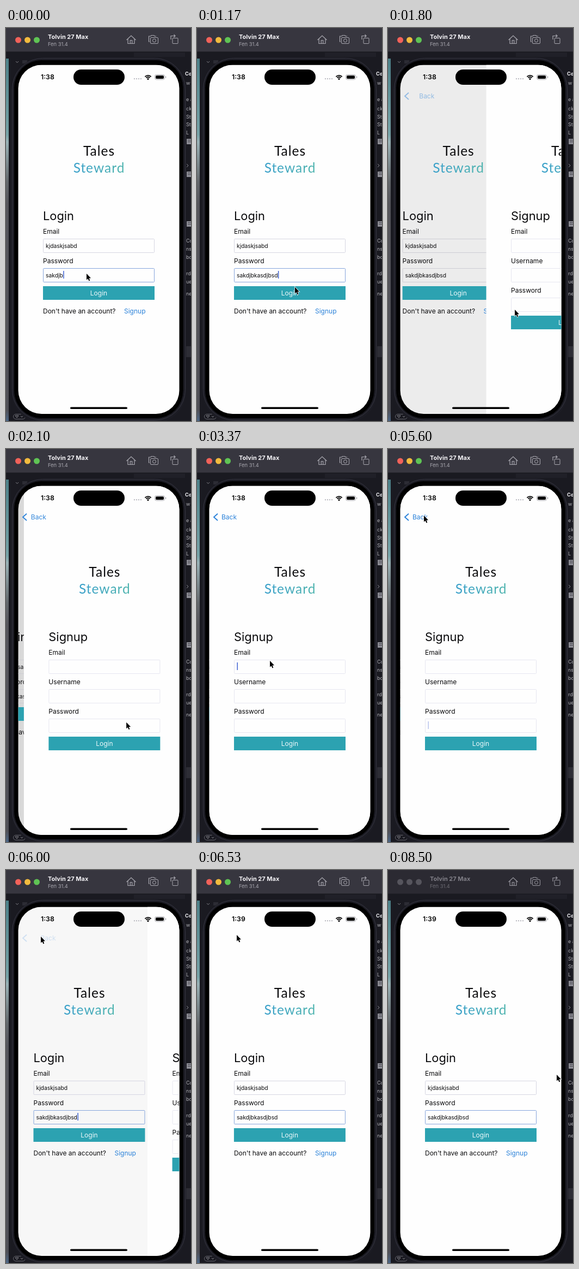
An HTML page with a canvas that plays this animation: 340x720 px, repeating every 8530 ms.

```html
<!DOCTYPE html>
<html lang="en">
<head>
<meta charset="utf-8">
<title>Login and signup</title>
<style>
  html, body { margin: 0; width: 100%; height: 100%; overflow: hidden; background: #1a1a21; }
  canvas { display: block; width: 340px; height: 720px; }
</style>
</head>
<body>
<canvas id="stage"></canvas>
<script>
const LOOP = 8530, W = 340, H = 720;
const SCREEN = { x: 22.5, y: 67.5, w: 296, h: 639.5, r: 43 };
const PAPER = 254, DIMMED = 216;
const TEAL = '#2ca2b1', BLUE = '#2b82d9', INK = '#0a0a0c';

const canvas = document.getElementById('stage');
const ratio = window.devicePixelRatio || 1;
canvas.width = W * ratio;
canvas.height = H * ratio;
const c = canvas.getContext('2d');

const clamp = v => Math.max(0, Math.min(1, v));
const mix = (a, b, p) => a + (b - a) * p;
const ease = p => p * p * (3 - 2 * p);
const grey = v => `rgb(${v}, ${v}, ${v})`;

function text(s, x, y, size, color, weight = 400, align = 'left', family = 'Inter') {
  c.font = `${weight} ${size}px ${family}, sans-serif`;
  c.textAlign = align;
  c.fillStyle = color;
  c.fillText(s, x, y);
}

function rect(x, y, w, h, color) {
  c.fillStyle = color;
  c.fillRect(x, y, w, h);
}

function round(x, y, w, h, r, color) {
  c.beginPath();
  c.roundRect(x, y, w, h, r);
  c.fillStyle = color;
  c.fill();
}

function frame(x, y, w, h, r, color, line = 1) {
  c.beginPath();
  c.roundRect(x, y, w, h, r);
  c.strokeStyle = color;
  c.lineWidth = line;
  c.stroke();
}

function disc(x, y, r, color) {
  c.beginPath();
  c.arc(x, y, r, 0, 7);
  c.fillStyle = color;
  c.fill();
}

function path(points, color, line = 1.2) {
  c.beginPath();
  for (let i = 0; i < points.length; i += 2) c.lineTo(points[i], points[i + 1]);
  c.strokeStyle = color;
  c.lineWidth = line;
  c.stroke();
}

// Critically damped spring, 0 to 1
function spring(ms) {
  const u = Math.max(0, ms) * 0.012;
  return 1 - (1 + u) * Math.exp(-u);
}

function pushed(t) {
  return t < 5750 ? spring(t - 1670) : 1 - spring(t - 5750);
}

function blink(t) {
  const p = t % 1000;
  return p < 700 ? 1 - clamp((p - 480) / 80) : clamp((p - 900) / 100);
}

// Pointer stops: time, x, y
const STOPS = [
  [0, 148, 450], [950, 148, 450], [1480, 233, 516], [1950, 233, 516],
  [2650, 134, 388], [3420, 134, 388], [3700, 136, 446], [4050, 136, 446],
  [4350, 138, 500], [4800, 138, 500], [5480, 66, 122], [5700, 66, 122],
  [6000, 64, 122], [6250, 64, 122], [6500, 73, 119], [6850, 73, 119],
  [7480, 326, 250], [8100, 310, 375], [LOOP, 310, 375]
];

function pointer(t) {
  const i = Math.max(1, STOPS.findIndex(s => s[0] > t));
  const a = STOPS[i - 1], b = STOPS[i];
  const p = ease((t - a[0]) / (b[0] - a[0]));
  c.save();
  c.translate(mix(a[1], b[1], p), mix(a[2], b[2], p));
  c.beginPath();
  [[0, 0], [0, 11.5], [2.6, 9.2], [4.5, 13.4], [6.3, 12.6], [4.5, 8.5], [8, 8.3]]
    .forEach(q => c.lineTo(...q));
  c.closePath();
  c.strokeStyle = '#fff';
  c.lineWidth = 1.4;
  c.stroke();
  c.fillStyle = '#000';
  c.fill();
  c.restore();
}

function desktop() {
  rect(0, 0, W, H, '#1a1a21');
  const side = c.createLinearGradient(0, 56, 0, H);
  [[0, '#4c8088'], [.21, '#76a2a6'], [.23, '#98b0b4'], [.34, '#63676b'],
   [.4, '#55555b'], [.97, '#4f4f56'], [1, '#4b6585']].forEach(s => side.addColorStop(...s));
  rect(0, 56, 5, H - 56, side);
  rect(235, 45, 94, 8, '#202028');
  path([18, 61, 20.5, 63.5, 23, 61], '#85858c', 1);
  rect(30, 59, 9, 6, '#2c2c34');

  // Clipped edge of the window behind
  [['Co', 87], ['w', 104], ['e a', 134], ['ck', 151], ['Sta', 166], ['Sta', 180],
   ['L', 195], ['Co', 393], ['nst', 408], ['bo', 423], ['rd', 453], ['ue', 468], ['ne', 490]]
    .forEach(([s, y], i) => text(s, i ? 331 : 329, y, 9, i ? '#b0b0b6' : '#eeeef2', i ? 400 : 700));
  path([332, 249, 335, 252, 332, 255], '#85858c', 1);
  [203, 263, 354].forEach(y => {
    rect(332, y, 8, 10, '#8c8c94');
    rect(334, y + 2, 6, 1, '#44444c');
    rect(334, y + 5, 6, 1, '#44444c');
  });
  rect(331, 583, 9, 20, '#2d2d35');
  frame(13.5, 707.5, 22, 9, 4.5, '#66666e');
  path([17, 710, 23, 710, 20, 714, 17, 710], '#85858c', 1);
  path([27, 711, 29, 713, 31, 711], '#85858c', 1);
}

function titleBar(active) {
  rect(0, 0, W, 44, active ? '#37363f' : '#2b2a32');
  rect(0, 43, W, 1, '#202027');
  const lights = active ? ['#f2625a', '#f2bb3e', '#5fc454'] : ['#56555d', '#56555d', '#56555d'];
  lights.forEach((col, i) => disc(22.5 + i * 17, 22, 5.5, col));
  text('Tolvin 27 Max', 77, 20, 11, active ? '#f4f3f6' : '#807f87', 700);
  text('Fen 31.4', 77, 33, 9.3, active ? '#a9a8b0' : '#6d6c74');

  const tone = active ? '#a9a8b0' : '#98979f';
  path([221.5, 22, 230, 14, 238.5, 22], tone);
  path([224, 20, 224, 28.5, 236, 28.5, 236, 20], tone);
  path([228.3, 28, 228.3, 22.5, 231.7, 22.5, 231.7, 28], tone);
  path([264, 25, 262.5, 25, 262.5, 15, 266, 15, 267, 13.5, 272, 13.5, 273, 15, 276, 15], tone);
  frame(265.5, 17.5, 14, 11, 1.5, tone);
  c.beginPath();
  c.arc(272.5, 23, 3, 0, 7);
  c.stroke();
  frame(306, 18.5, 10, 10, 1, tone);
  path([303, 21, 303, 14.5, 311, 14.5], tone);
  path([308.5, 12, 311, 14.5, 308.5, 17], tone);
}

function body() {
  round(10, 54, 321, 670, 58, '#1c1c24');
  frame(11.5, 55.5, 318, 663, 56, '#34343f');
  round(14, 58, 312.5, 658, 52, '#000');
  frame(14.5, 58.5, 311.5, 657, 51, '#1e1e27');
}

function brand() {
  c.letterSpacing = '1px';
  text('Tales', 171, 234, 24.5, INK, 400, 'center', 'Lato');
  const g = c.createLinearGradient(123, 0, 218, 0);
  g.addColorStop(0, '#389fca');
  g.addColorStop(1, '#4fb4ae');
  text('Steward', 171, 265, 24.5, g, 400, 'center', 'Lato');
  c.letterSpacing = '0px';
}

function caret(x, y, alpha) {
  c.globalAlpha = alpha;
  rect(x, y + 5, 1.4, 14, '#3157cf');
  c.globalAlpha = 1;
}

function field(label, y, border, value = '', caretAlpha = 0) {
  text(label, 68, y - 9.5, 12, INK);
  frame(68.5, y + .5, 204, 25, 1, border);
  text(value, 73, y + 16.5, 10.3, INK);
  if (caretAlpha > 0) {
    c.font = '400 10.3px Inter, sans-serif';
    caret(73.5 + c.measureText(value).width, y, caretAlpha);
  }
}

function button(y) {
  rect(68, y, 205, 25, TEAL);
  text('Login', 170.5, y + 17, 12, '#eef9fb', 400, 'center');
}

function loginPage(t, p) {
  rect(0, SCREEN.y, W + 90, SCREEN.h, grey(Math.round(mix(PAPER, DIMMED, p))));
  brand();
  text('Login', 68, 351.5, 21.8, INK);
  const typed = Math.min(14, 6 + Math.floor(t / 110));
  const focused = t < 1670 || t > 5800;
  const glow = t < 960 ? 1 : blink(t + 60);
  field('Email', 386, focused ? '#d6d6e2' : '#cdcdd4', 'kjdaskjsabd');
  field('Password', 440, focused ? '#86a6dc' : '#cdcdd4',
    'sakdjbkasdjbsd'.slice(0, typed), focused ? glow : 0);
  button(473);
  text("Don't have an account?", 68, 523, 12, INK);
  text('Signup', 217, 523, 12, BLUE);
}

function signupPage(t) {
  rect(SCREEN.x, SCREEN.y, SCREEN.w, SCREEN.h, grey(PAPER));
  brand();
  text('Signup', 68, 351.5, 21.8, INK);
  const focus = t < 2750 || t > 5750 ? -1 : t < 3800 ? 0 : t < 4450 ? 1 : 2;
  ['Email', 'Username', 'Password'].forEach((label, i) =>
    field(label, 386 + i * 54, '#e6e6f0', '', focus === i ? blink(t - 70) : 0));
  button(527);
}

function backLink(p) {
  c.globalAlpha = p;
  path([38, 118.5, 31, 124.8, 38, 131], BLUE, 1.9);
  text('Back', 45 + 23 * (1 - p), 129, 12, BLUE);
  c.globalAlpha = 1;
}

function statusBar(t) {
  text(t < 6300 ? '1:38' : '1:39', 64, 94.3, 12.3, '#000', 600);
  round(124, 76, 94, 28, 14, '#000');
  for (let i = 0; i < 4; i++) disc(236 + i * 4, 93, 1.2, '#bebec4');
  c.lineWidth = 1.9;
  c.strokeStyle = '#000';
  [7.6, 4.7].forEach(r => {
    c.beginPath();
    c.arc(261, 94.5, r, -Math.PI * .76, -Math.PI * .24);
    c.stroke();
  });
  disc(261, 93.3, 1.6, '#000');
  frame(273.5, 85.5, 18, 9, 3, '#a4a4aa');
  round(275, 87, 15, 6, 1.8, '#000');
  rect(293, 88.5, 1.2, 3, '#a4a4aa');
}

function screen(t) {
  const p = pushed(t);
  c.save();
  c.beginPath();
  c.roundRect(SCREEN.x, SCREEN.y, SCREEN.w, SCREEN.h, SCREEN.r);
  c.clip();

  c.save();
  c.translate(-p * SCREEN.w * .3, 0);
  loginPage(t, p);
  c.restore();

  if (p > .001) {
    c.save();
    c.translate((1 - p) * SCREEN.w, 0);
    signupPage(t);
    c.restore();
    backLink(p);
  }
  statusBar(t);
  round(118, 694.5, 105, 3.6, 1.8, '#000');
  c.restore();
}

function draw(t) {
  c.setTransform(ratio, 0, 0, ratio, 0, 0);
  desktop();
  titleBar(t < 7500);
  body();
  screen(t);
  pointer(t);
}

const start = performance.now();
function tick(now) {
  draw(Math.max(0, now - start) % LOOP);
  requestAnimationFrame(tick);
}
draw(0);
requestAnimationFrame(tick);
</script>
</body>
</html>
```
